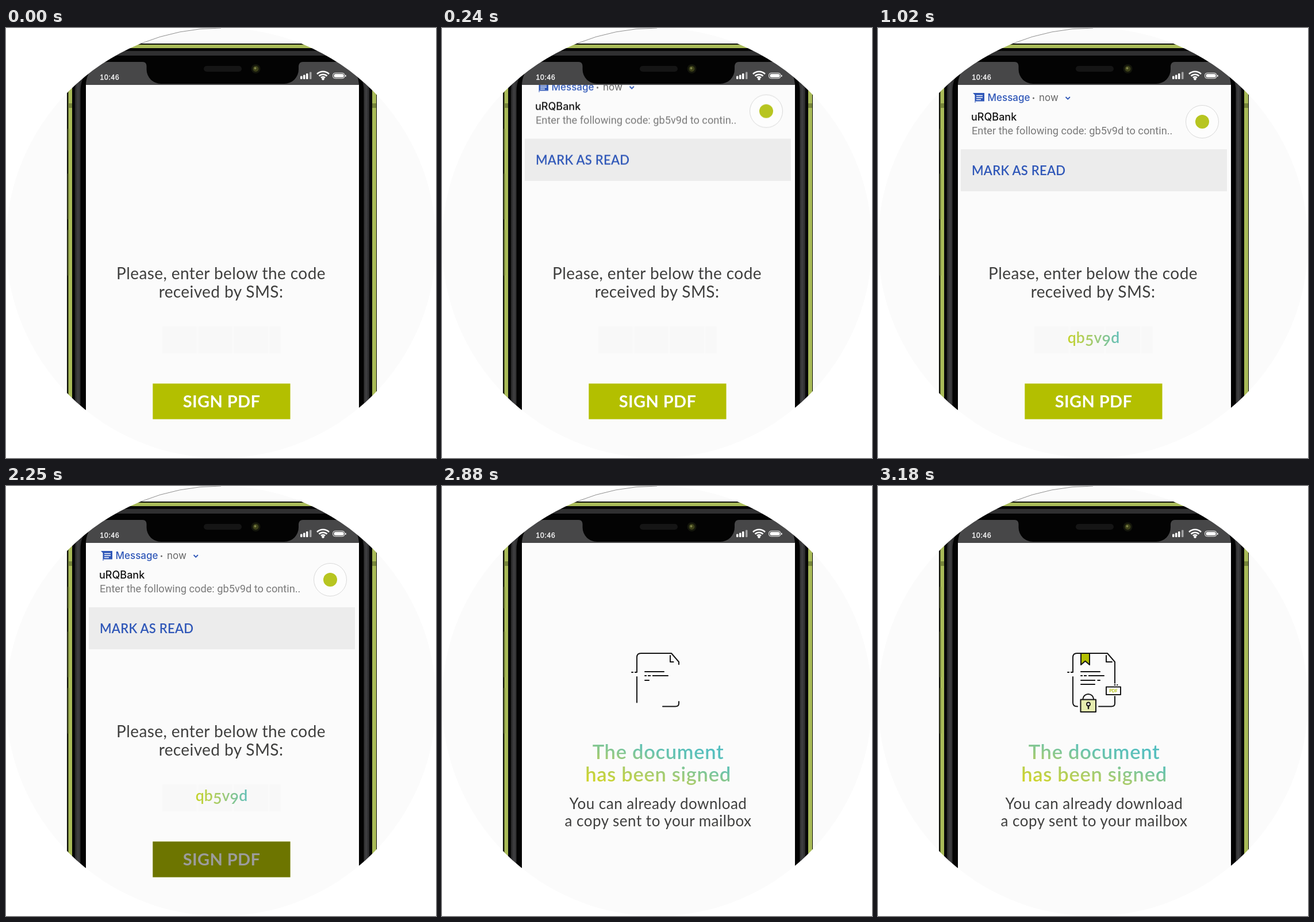
These frames come from a looping animation (748 px wide and 748 px high, 3900 ms). An HTML page:

```html
<!DOCTYPE html>
<html lang="en">
<head>
<meta charset="utf-8">
<title>Sign a PDF with an SMS code</title>
<style>
  html, body { margin: 0; width: 100%; height: 100%; overflow: hidden; background: #fff; }
  svg { display: block; width: 100vw; height: 100vh; }
  text { font-family: Lato, "Open Sans", sans-serif; }
  .mid { text-anchor: middle; }
  .ask { font-size: 28px; letter-spacing: .4px; fill: #3f3f3e; }
  .button { font-size: 29px; font-weight: 700; letter-spacing: .4px; fill: #fff; }
  .code { font-size: 26.5px; font-weight: 600; letter-spacing: .2px; fill: url(#codeInk); }
  .done { font-size: 34.5px; font-weight: 600; letter-spacing: .7px; fill: url(#doneInk); }
  .note { font-size: 26px; letter-spacing: .5px; fill: #3f3f3e; }
  .clock { font: 12px "Liberation Sans", Arial, sans-serif; letter-spacing: .8px; fill: #fff; stroke: #fff; stroke-width: .35; }
  .app { font: 500 17px Inter, sans-serif; fill: #2f57b8; }
  .when { font: 17px Inter, sans-serif; fill: #666; }
  .sender { font: 500 18px Inter, sans-serif; fill: #111; }
  .sms { font: 18.2px Roboto, sans-serif; fill: #7a7a7a; }
  .read { font-size: 22px; font-weight: 600; letter-spacing: .25px; fill: #2f57b8; }
  .pen { fill: none; stroke: #161616; stroke-width: 2; stroke-linecap: round; stroke-linejoin: round; }
  .draw { stroke-dasharray: 1 2; }
  .gap { fill: #fbfbfb; }
  #mark { transform-origin: 360px 291px; }
  #tag { transform-origin: 409px 356px; }
  #lock { transform-origin: 366px 378px; }
</style>
</head>
<body>
<svg viewBox="0 0 748 748">
  <defs>
    <clipPath id="screen"><rect x="139" y="99" width="475" height="649"/></clipPath>
    <linearGradient id="codeInk" gradientUnits="userSpaceOnUse" x1="332" y1="0" x2="420" y2="0">
      <stop offset="0" stop-color="#c3d32f"/><stop offset=".5" stop-color="#a3cb72"/><stop offset="1" stop-color="#5fbfb8"/>
    </linearGradient>
    <linearGradient id="doneInk" gradientUnits="userSpaceOnUse" x1="250" y1="508" x2="276" y2="410">
      <stop offset="0" stop-color="#cfd42c"/><stop offset=".4" stop-color="#a6cc72"/><stop offset=".75" stop-color="#66c3b0"/><stop offset="1" stop-color="#55bfc0"/>
    </linearGradient>
    <linearGradient id="rim" gradientUnits="userSpaceOnUse" x1="120" y1="0" x2="632" y2="0">
      <stop offset="0" stop-color="#262627"/><stop offset=".01" stop-color="#404042"/><stop offset=".018" stop-color="#303031"/>
      <stop offset=".982" stop-color="#303031"/><stop offset=".99" stop-color="#404042"/><stop offset="1" stop-color="#262627"/>
    </linearGradient>
  </defs>

  <rect width="748" height="748" fill="#fbfbfb"/>

  <!-- phone body -->
  <rect x="106" y="27" width="539" height="800" rx="80" fill="#10120a"/>
  <rect x="108.5" y="29" width="535.5" height="800" rx="78" fill="#a9bb58"/>
  <g fill="#6d7a38">
    <rect x="107.5" y="175" width="2" height="38" rx="1"/>
    <rect x="107.5" y="253" width="2" height="80" rx="1"/>
    <rect x="107.5" y="351" width="2" height="80" rx="1"/>
  </g>
  <path d="M108.5 131h7v8h-7zM636 131h8v8h-8z" fill="#77863a"/>
  <rect x="115" y="35" width="522" height="800" rx="74" fill="#070707"/>
  <rect x="120" y="40" width="512" height="800" rx="70" fill="url(#rim)"/>
  <rect x="129.500" y="48" width="493" height="800" rx="62" fill="#030303"/>
  <rect x="139" y="98" width="475" height="660" fill="#fbfbfb"/>

  <g clip-path="url(#screen)">
    <g id="form">
      <text class="ask mid" x="374" y="437">Please, enter below the code</text>
      <text class="ask mid" x="374" y="469">received by SMS:</text>
      <rect x="272" y="519" width="206" height="47" fill="#f8f8f8"/>
      <path d="M333 519v47M395 519v47M457 519v47" stroke="#fafafa" stroke-width="3"/>
      <text id="code" class="code mid" x="375" y="548">qb<tspan dy="5">5</tspan><tspan dy="-5">v</tspan><tspan dy="5">9</tspan><tspan dy="-5">d</tspan></text>
      <rect x="255.300" y="618.500" width="239.200" height="62" fill="#b3bf00"/>
      <text class="button mid" x="375" y="660">SIGN PDF</text>
      <rect id="press" x="255.300" y="618.500" width="239.200" height="62" fill="#000" fill-opacity=".39"/>
    </g>

    <g id="notice">
      <rect x="144" y="59" width="463" height="152" fill="#fbfbfb"/>
      <path d="M165 113h20v14.500h-15.500v2.500h-1v-13.500z" fill="#2f57b8"/>
      <path d="M171 117.500h11M171 121h11M171 124.500h8" stroke="#fff" stroke-width="1.5"/>
      <text class="app" x="190.500" y="127">Message</text>
      <circle cx="270.500" cy="122" r="1.500" fill="#666"/>
      <text class="when" x="280" y="127">now</text>
      <path d="M326.500 120l3.700 3.700 3.700-3.700" fill="none" stroke="#2f57b8" stroke-width="1.800"/>
      <text class="sender" x="162" y="160.500">uRQBank</text>
      <text class="sms" x="163" y="185">Enter the following code: gb5v9d to contin..</text>
      <circle cx="564" cy="163" r="28.500" fill="#fdfdfd" stroke="#d9d9d9"/>
      <circle cx="564" cy="163" r="12" fill="#b7c520"/>
      <rect x="144" y="211" width="463" height="73" fill="#ececec"/>
      <text class="read" x="163" y="256">MARK AS READ</text>
    </g>

    <g id="signed">
      <g id="outline" class="pen">
        <path class="draw" pathLength="1" d="M330 324H339V298Q339 291 346 291H399L412 306V343"/>
        <path class="draw" pathLength="1" d="M339 332V377Q339 383.500 347 383.500"/>
        <path class="draw" pathLength="1" d="M384 383.500H406Q412 383.500 412 378V366"/>
        <path class="draw" pathLength="1" d="M397 295V306H407"/>
      </g>
      <g id="lines" class="pen">
        <path class="draw" pathLength="1" d="M353 323H386"/>
        <path class="draw" pathLength="1" d="M353 330H393"/>
        <path class="draw" pathLength="1" d="M353 338H386"/>
        <path class="draw" pathLength="1" d="M353 345H377"/>
      </g>
      <path class="gap" d="M333 322h2v4h-2zM356 328h2v4h-2zM363 328h3v4h-3zM378 336h3.500v4h-3.500z"/>
      <path id="mark" class="pen" style="fill:#b3bf00" d="M353 291V311L360.500 304.500 368 311V291z"/>
      <g id="tag">
        <path class="pen" d="M411.500 346h1M416 346h.5"/>
        <rect class="pen" style="fill:#fbfbfb" x="397" y="349.500" width="25" height="13.500"/>
        <text class="mid" x="409.500" y="359" font-size="7.500" font-weight="700" fill="#b3bf00">PDF</text>
      </g>
      <g id="lock">
        <path class="pen" d="M356.500 371V370A9.300 9 0 0 1 375 370V371"/>
        <rect class="pen" style="fill:#e6edb0" x="352.500" y="371.500" width="26.500" height="21.500"/>
        <circle class="pen" style="fill:#fbfbfb;stroke-width:1.800" cx="366" cy="379.500" r="3"/>
        <path class="pen" style="stroke-width:2.500" d="M366 383V387"/>
      </g>
      <text class="done mid" x="376" y="475">The document</text>
      <text class="done mid" x="376" y="514">has been signed</text>
      <text class="note mid" x="376" y="562">You can already download</text>
      <text class="note mid" x="376" y="592">a copy sent to your mailbox</text>
    </g>
  </g>

  <!-- status bar and notch -->
  <path fill="#474748" d="M139 99C140 76 154 59 178 59H238Q244 59 244.500 66V72A25 25 0 0 0 269.500 97H484A25 25 0 0 0 509 72V66Q510 59 516 59H575C599 59 613 76 614 99z"/>
  <rect x="344" y="66" width="66" height="10" rx="5" fill="#151515"/>
  <circle cx="434.500" cy="71" r="8" fill="#14160c"/>
  <circle cx="434.500" cy="71" r="5" fill="#3c4019"/>
  <circle cx="433.500" cy="70" r="2" fill="#7c8148"/>
  <text class="clock" x="163.500" y="90">10:46</text>
  <g fill="#fff">
    <rect x="512" y="83.500" width="3.500" height="5.500" rx="1"/>
    <rect x="517" y="81.500" width="3.500" height="7.500" rx="1"/>
    <rect x="522" y="79" width="3.500" height="10" rx="1"/>
    <rect x="528" y="76.500" width="3.500" height="12.500" rx="1" opacity=".5"/>
    <circle cx="551.500" cy="88.500" r="2.300"/>
    <rect x="570.500" y="80" width="17" height="6" rx="2.500"/>
    <rect x="590" y="81.500" width="1.500" height="3.500" rx=".7"/>
  </g>
  <g fill="none" stroke="#fff">
    <path stroke-width="2.500" d="M541 80A15 15 0 0 1 562 80M544.500 83.500A10 10 0 0 1 558.500 83.500M548 86.500A5 5 0 0 1 555 86.500"/>
    <rect x="568.500" y="78.300" width="20.500" height="9.400" rx="4"/>
  </g>

  <!-- white corners around the disc -->
  <path fill="#fff" fill-rule="evenodd" d="M-2-2H750V750H-2zM0 374A374 374 0 0 0 748 374A374 374 0 0 0 0 374z"/>
  <path d="M234 27.200A374 374 0 0 1 374 0" fill="none" stroke="#444" stroke-width=".6"/>
</svg>

<script>
const LOOP = 3900, TICK = 30;
const all = q => [...document.querySelectorAll(q)];

// Holds each [ms, value] until the next one.
function play(el, prop, points) {
  const last = points[points.length - 1];
  const frames = [...points, [LOOP, last[1]]].map(([ms, v]) =>
    ({ offset: ms / LOOP, [prop]: v, easing: 'step-end' }));
  el.animate(frames, { duration: LOOP, iterations: Infinity });
}

// Values of fn(0..1), one per tick.
function ramp(from, to, fn) {
  const n = Math.round((to - from) / TICK);
  const points = [[0, fn(0)]];
  for (let i = 1; i <= n; i++) points.push([from + i * TICK, fn(i / n)]);
  return points;
}

function show(q, from, to = LOOP) {
  const points = [[0, from ? 0 : 1]];
  if (from) points.push([from, 1]);
  if (to < LOOP) points.push([to, 0]);
  play(all(q)[0], 'opacity', points);
}

const draw = (el, from, to) =>
  play(el, 'strokeDashoffset', ramp(from, to, k => String(1.05 * (1 - k))));

show('#form', 0, 2400);
show('#notice', 120, 2400);
show('#code', 1020);
show('#press', 2250);
show('#signed', 2400);

play(all('#notice')[0], 'transform',
  ramp(90, 300, k => `translateY(${-225 * (1 - k) ** 2}px)`));

all('#outline path').forEach(p => draw(p, 2640, 2940));
[[2700, 2790], [2790, 2880], [2850, 2970], [2910, 3000]]
  .forEach(([a, b], i) => draw(all('#lines path')[i], a, b));

const pop = (q, from, to, axis) =>
  play(all(q)[0], 'transform', ramp(from, to, k => `scale${axis}(${k})`));
pop('#mark', 2880, 3030, 'Y');
pop('#tag', 2910, 3090, '');
pop('#lock', 2970, 3180, '');
</script>
</body>
</html>
```
